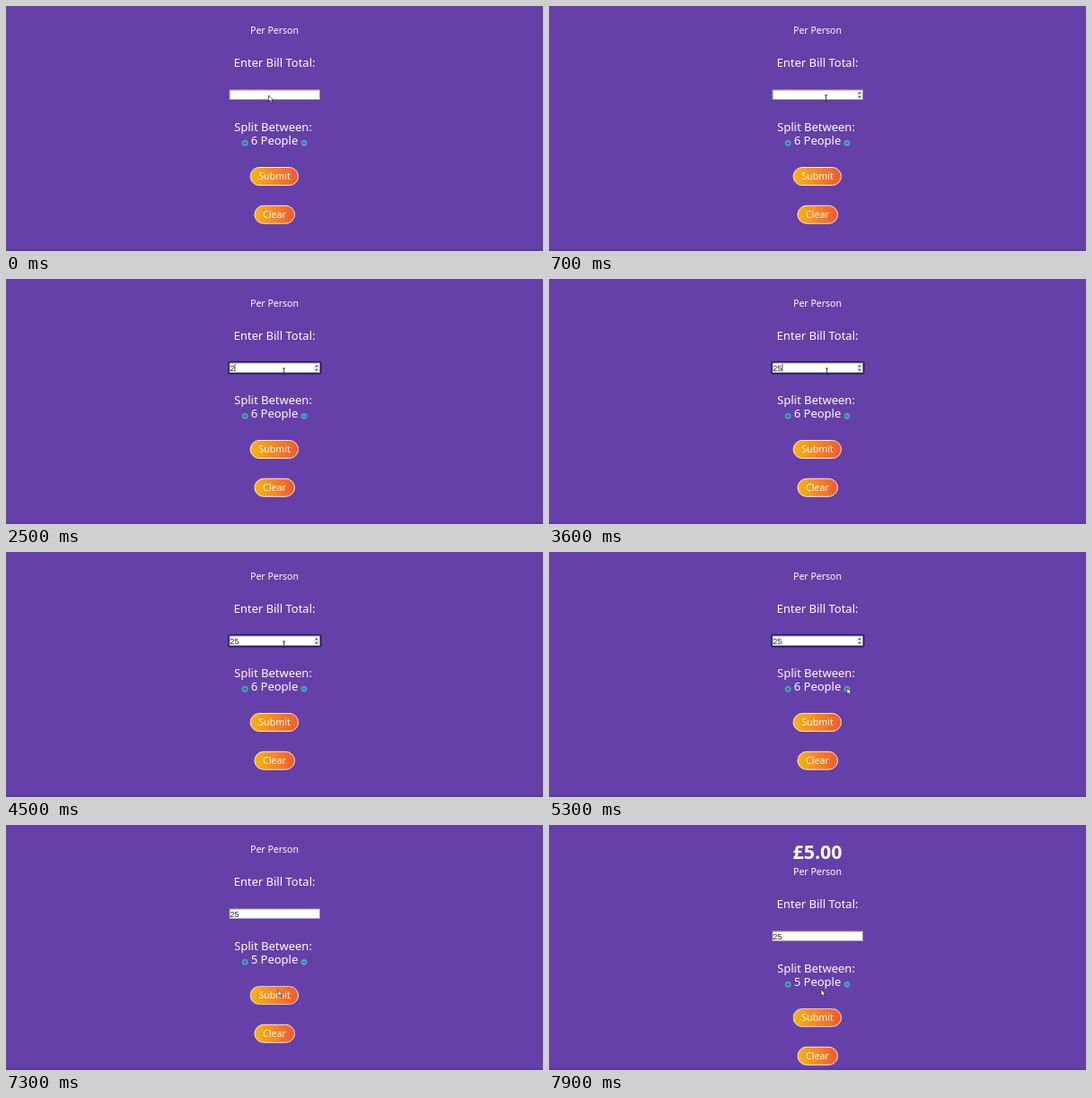
Recreate the animation shown at these times as an HTML page. Size 600 by 274 pixels, loop 8 s.

```html
<!DOCTYPE html>
<html lang="en">
<head>
<meta charset="utf-8">
<title>Bill splitter</title>
<style>
html, body { margin: 0; width: 100%; height: 100%; overflow: hidden; background: #6540a8; }
svg { display: block; width: 600px; height: 274px; }
text { font-family: Ubuntu, "Noto Sans", sans-serif; fill: #fff; text-anchor: middle; }
.big { font-size: 13px; }
.label { font-size: 10.7px; }
.pill { fill: url(#warm); stroke: #f6e9e0; }
.focus { fill: none; stroke: #3f62d8; stroke-dasharray: 1 1; }
#value { font: 9px "Liberation Sans", Arial, sans-serif; fill: #222; text-anchor: start; }
</style>
</head>
<body>
<svg viewBox="0 0 600 274">
  <defs>
    <linearGradient id="warm">
      <stop offset="0" stop-color="#fbb40f"/>
      <stop offset="1" stop-color="#f0592f"/>
    </linearGradient>
    <g id="round">
      <circle r="3.2" fill="#48a5bd" stroke="#5b8fbd" stroke-width=".8"/>
      <path d="M-1.6 0H1.6" stroke="#28578b"/>
    </g>
  </defs>
  <rect width="600" height="274" fill="#6540a8"/>
  <path d="M0 273H600" stroke="#5c3a98" stroke-width="2"/>
  <text id="result" x="300" y="37.7" font-size="21.4" font-weight="700">£5.00</text>

  <g id="page">
    <text x="300" y="31" font-size="10.5">Per Person</text>
    <text class="big" x="300" y="68">Enter Bill Total:</text>

    <rect id="ring" x="249" y="93" width="102.5" height="12.5" rx="1" fill="none" stroke="#17205f" stroke-width="2"/>
    <rect id="field" x="250" y="94" width="100.5" height="10.5" fill="#fff" stroke="#a9a5ae"/>
    <text id="value" x="250.2" y="102.5"></text>
    <path id="caret" stroke="#222" stroke-width=".8"/>
    <g id="spinner">
      <rect x="344" y="95" width="6" height="9" fill="#eee"/>
      <path d="M345 98.3L347 96L349 98.3ZM345 100.8L347 103.1L349 100.8Z" fill="#555"/>
    </g>

    <text class="big" x="298.5" y="139.6">Split Between:</text>
    <text id="people" class="big" x="300" y="155"></text>
    <use href="#round" x="267" y="153.3"/>
    <path d="M267 151.7V154.9" stroke="#28578b"/>
    <use href="#round" x="333" y="153.3"/>
    <rect id="minusFocus" class="focus" x="328.5" y="149" width="9" height="9"/>

    <rect class="pill" x="273" y="180.5" width="53.5" height="20" rx="10"/>
    <text class="label" x="300" y="194.3">Submit</text>
    <rect id="submitFocus" class="focus" x="272.5" y="180" width="55" height="21"/>
    <rect class="pill" x="277.8" y="223.3" width="44.7" height="20" rx="10"/>
    <text class="label" x="300" y="237.2">Clear</text>
  </g>

  <path id="arrow" d="M0 0V7L1.6 5.6L2.8 8.2L4 7.6L2.9 5.1H5Z" fill="#fff" stroke="#222" stroke-width=".7"/>
  <path id="beam" d="M-1.5 -3.5H1.5M0 -3.5V3.5M-1.5 3.5H1.5" stroke="#333" stroke-width=".9"/>
</svg>
<script>
const LOOP = 8000;
const FOCUS = 1700, KEY1 = 2300, KEY2 = 2560, MINUS = 5600, SUBMIT = 7250, RESULT = 7350;
// Pointer stops: time, x, y
const path = [
  [0, 293.5, 100], [100, 293.5, 100], [800, 310.5, 103.5], [4500, 310.5, 103.5],
  [5200, 333, 152], [5700, 333, 152], [6100, 318, 165.5], [6900, 304, 184.5], [LOOP, 304, 184]
];
const $ = id => document.getElementById(id);
const show = (id, on) => $(id).setAttribute("visibility", on ? "visible" : "hidden");

function pointer(t) {
  const i = path.findIndex(p => p[0] > t);
  const [t0, x0, y0] = path[i - 1], [t1, x1, y1] = path[i];
  const u = (t - t0) / (t1 - t0), k = u * u * (3 - 2 * u);
  return [x0 + (x1 - x0) * k, y0 + (y1 - y0) * k];
}

function draw(t) {
  const [x, y] = pointer(t);
  const hover = t >= 100 && x > 249 && x < 351 && y > 93 && y < 106;
  const focused = t >= FOCUS && t < MINUS;
  const value = t < KEY1 ? "" : t < KEY2 ? "2" : "25";
  const lastKey = t < KEY1 ? FOCUS : t < KEY2 ? KEY1 : KEY2;
  const caretX = 250.8 + value.length * 5;

  $("value").textContent = value;
  $("caret").setAttribute("d", `M${caretX} 95V103.5`);
  show("caret", focused && (t - lastKey) % 1000 < 500);
  show("ring", focused);
  show("spinner", hover || focused);
  $("people").textContent = (t < MINUS ? 6 : 5) + " People";
  show("minusFocus", t >= MINUS && t < SUBMIT);
  show("submitFocus", t >= SUBMIT);
  show("result", t >= RESULT);
  $("page").setAttribute("transform", `translate(0 ${t >= RESULT ? 25 : 0})`);

  for (const id of ["arrow", "beam"]) $(id).setAttribute("transform", `translate(${x} ${y})`);
  show("arrow", !hover);
  show("beam", hover);
}

const start = performance.now();
function tick() {
  draw((performance.now() - start) % LOOP);
  requestAnimationFrame(tick);
}
tick();
</script>
</body>
</html>
```
